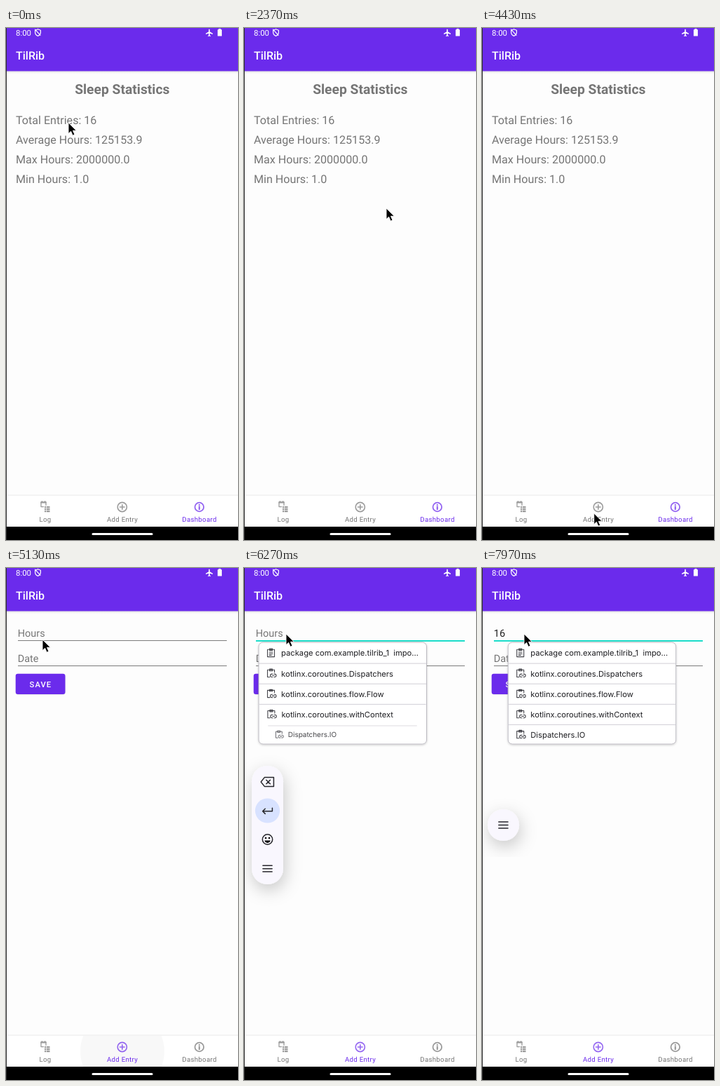
Animation of 331 by 730 pixels, one loop 8 s. Source, as an HTML page:

```html
<!DOCTYPE html>
<html lang="en">
<head>
<meta charset="utf-8">
<title>Sleep tracker</title>
<style>
  html, body { margin: 0; width: 100%; height: 100%; overflow: hidden; background: #fdfdfd; }
  svg { display: block; width: 331px; height: 730px; font-family: Roboto, sans-serif; text-rendering: geometricPrecision; }
  .line { fill: none; stroke: currentColor; stroke-linecap: round; stroke-linejoin: round; }
  .gray { fill: #757575; }
  .tab { color: #757575; }
  .tab.on { color: #6b2bec; }
  .tab text { font-size: 9.64px; letter-spacing: .033em; text-anchor: middle; fill: currentColor; }
  .tab g { opacity: .72; }
  .stats { font-size: 16.1px; }
  .field { font-size: 14.45px; }
  .popup text { font: 11.2px Inter, sans-serif; fill: #1d1d21; }
</style>
</head>
<body>
<svg viewBox="0 0 331 730">
  <defs>
    <linearGradient id="fall" x2="0" y2="1">
      <stop stop-color="#000" stop-opacity=".12"/>
      <stop offset="1" stop-color="#000" stop-opacity="0"/>
    </linearGradient>
    <filter id="softShadow" x="-100%" y="-50%" width="300%" height="200%">
      <feDropShadow dx="2" dy="8" stdDeviation="12" flood-opacity=".22"/>
    </filter>
    <filter id="popupShadow" x="-10%" y="-10%" width="120%" height="120%">
      <feDropShadow dx="0" dy="1" stdDeviation="1.5" flood-opacity=".2"/>
    </filter>
    <clipPath id="navClip"><rect y="667" width="331" height="44"/></clipPath>
  </defs>

  <rect width="331" height="730" fill="#fdfdfd"/>
  <rect y="61" width="331" height="4" fill="url(#fall)"/>
  <rect width="331" height="61.5" fill="#6b2bec"/>

  <g fill="#fff" color="#fff">
    <text x="14" y="10.6" font-size="11.4">8:00</text>
    <path class="line" stroke-width="1.2" d="M45.5 1.8 49.4 3.3V6.4Q49.2 9.8 45.5 11.4 41.8 9.8 41.6 6.4V3.3ZM41.5 2.2 49 10.4"/>
    <path d="M289.2 2.2q.8-1.4 1.6 0V5.2L295 7.8V9L290.8 7.8V10.2L292 11.2V12L290 11.4 288 12V11.2L289.2 10.2V7.8L285 9V7.8L289.2 5.2Z"/>
    <path d="M303.4 1h3v1.2h1.5V11.6h-6V2.2h1.5Z"/>
    <text x="14" y="45.3" font-size="16.06" font-weight="500">TilRib</text>
  </g>

  <g id="dashboard" class="gray">
    <text x="165.8" y="94.4" font-size="19.27" font-weight="700" text-anchor="middle">Sleep Statistics</text>
    <g class="stats">
      <text x="14" y="136.6">Total Entries: 16</text>
      <text x="14" y="164.7">Average Hours: 125153.9</text>
      <text x="14" y="192.8">Max Hours: 2000000.0</text>
      <text x="14" y="220.9">Min Hours: 1.0</text>
    </g>
  </g>

  <g id="entryForm">
    <g class="field gray">
      <text id="hours" x="16.8" y="97.6">Hours</text>
      <text x="16.8" y="133.7">Date</text>
    </g>
    <rect id="hoursLine" x="17" width="298"/>
    <rect x="17" y="139" width="298" height="1" fill="#7c7c7c"/>
    <rect x="14" y="152" width="70.5" height="28.5" rx="3.2" fill="#000" opacity=".15"/>
    <rect x="13.7" y="150.7" width="70.8" height="29.3" rx="3.2" fill="#6b2bec"/>
    <text x="33.6" y="169.7" font-size="11.24" font-weight="500" letter-spacing="1" fill="#fff">SAVE</text>
  </g>

  <rect y="666" width="331" height="46" fill="#fff"/>
  <rect y="665.5" width="331" height="1.2" fill="#ededed"/>
  <g clip-path="url(#navClip)"><circle id="ripple" cx="166" cy="689" fill="#000"/></g>

  <g class="tab" id="tabLog">
    <g fill="currentColor">
      <path class="line" stroke-width="1.3" d="M53.6 682.6H50V676.4H57V680.4"/>
      <path d="M49.4 675.2h1.2v-1h1.6v1h2.6v-1h1.6v1h1.2v2.4h-8.2z"/>
      <path d="M55 682h2v2.2h-2zm2.7 0h4.8v2.2h-4.8zM55 685h2v2.2h-2zm2.7 0h4.8v2.2h-4.8zM55 688h2v2.2h-2zm2.7 0h4.8v2.2h-4.8z"/>
    </g>
    <text x="56" y="703.6">Log</text>
  </g>
  <g class="tab" id="tabAdd">
    <g><path class="line" stroke-width="1.6" d="M159.2 683a6.6 6.6 0 1 0 13.2 0a6.6 6.6 0 1 0-13.2 0M162.5 683h6.6M165.8 679.7v6.6"/></g>
    <text x="166" y="703.6">Add Entry</text>
  </g>
  <g class="tab" id="tabDash">
    <g>
      <path class="line" stroke-width="1.8" d="M269.5 683a6.3 6.3 0 1 0 12.6 0a6.3 6.3 0 1 0-12.6 0"/>
      <path fill="currentColor" d="M274.7 679h2.2v1.8h-2.2zm0 2.4h2.2v5.6h-2.2z"/>
    </g>
    <text x="276" y="703.6">Dashboard</text>
  </g>

  <rect y="711" width="331" height="19"/>
  <rect x="122.5" y="720" width="87" height="3" rx="1.5" fill="#fff"/>

  <g id="toolbar" color="#26262b">
    <rect id="pill" width="45" rx="22.5" fill="#f9f7fe" filter="url(#softShadow)"/>
    <g id="tools">
      <path class="line" stroke-width="1.5" d="M29.2 298.6H42.4V311.4H29.2L24.2 305ZM31.8 302.2l5.6 5.6M37.4 302.2l-5.6 5.6"/>
      <circle cx="33.5" cy="346" r="17.6" fill="#d8e2ff"/>
      <path class="line" stroke-width="1.5" d="M40.4 342.2V346.8H26.8M30.2 343.2 26.6 346.8 30.2 350.4"/>
      <circle class="line" stroke-width="1.5" cx="33.5" cy="387" r="7.2"/>
      <path d="M29.4 388.6h8.2a4.2 4.2 0 0 1-8.2 0Z"/>
      <circle cx="31" cy="385" r="1.3"/><circle cx="36" cy="385" r="1.3"/>
    </g>
    <path id="menu" class="line" stroke-width="1.5" d="M-6.6-4.4H6.6M-6.6 0H6.6M-6.6 4.4H6.6"/>
  </g>

  <g id="popup" class="popup">
    <rect x=".5" y="106" width="239.5" height="145" rx="6" fill="#fff" stroke="#bcbac2" filter="url(#popupShadow)"/>
  </g>

  <rect width="1" height="730" fill="#2b2b2b"/>
  <path id="cursor" d="M0 0V15.6L3.6 12.3 6.2 18.2 9 17 6.5 11.3H11.4Z" stroke="#fff" stroke-width=".9"/>
</svg>

<script>
const LOOP = 8000;
const ADD_TAP = 4640, FOCUS = 5580, POPUP = 5940;
const KEYS = [7180, 7400];
const COLLAPSE = 7270;

// Pointer tip: time, x, y
const POINTER = [
  [0, 89, 135], [1230, 126, 137], [1500, 130, 139], [2370, 203, 257], [2560, 203, 263],
  [3260, 72, 700], [3670, 60, 693], [4020, 60, 693], [4480, 163, 692], [4670, 163, 692],
  [5020, 55, 107], [5130, 52, 102], [5370, 60, 94]
];
const SUGGESTIONS = [
  "package com.example.tilrib_1\u00a0 impo…",
  "kotlinx.coroutines.Dispatchers",
  "kotlinx.coroutines.flow.Flow",
  "kotlinx.coroutines.withContext",
  "Dispatchers.IO"
];
const CLIP_TEXT = "M1 2.2H11V12.6H1ZM4 1H8V3.4H4ZM3.6 6H8.4M3.6 8.2H8.4M3.6 10.4H6.6";
const CLIP_LINK = "M4.2 12.4H1V2.2H11V5.6M4 1H8V3.6H4ZM8.2 8H7.2a2.2 2.2 0 0 0 0 4.4H8.2M10.4 8H11.2a2.2 2.2 0 0 1 0 4.4H10.4M7.8 10.2H10.8";

const $ = id => document.getElementById(id);
const set = (el, attrs) => { for (const key in attrs) el.setAttribute(key, attrs[key]); };
const show = (el, on) => { el.style.display = on ? "" : "none"; };
const mix = (a, b, p) => a + (b - a) * p;
const progress = (t, start, length) => Math.min(1, Math.max(0, (t - start) / length));
const smooth = p => p * p * (3 - 2 * p);
const easeOut = p => 1 - (1 - p) ** 2;

function addRow(label, i) {
  const row = document.createElementNS("http://www.w3.org/2000/svg", "g");
  const top = 107 + 29.1 * i;
  row.innerHTML = `${i ? `<path d="M.5 ${top}H239.5" stroke="#d0ced6"/>` : ""}
    <path class="line" color="#45454b" stroke-width="1.1" d="${i ? CLIP_LINK : CLIP_TEXT}" transform="translate(12 ${top + 7})"/>
    <text x="32.6" y="${top + 18.4}">${label}</text>`;
  $("popup").append(row);
  return row;
}
const rows = SUGGESTIONS.map(addRow);

function pointerAt(t) {
  const next = POINTER.findIndex(point => point[0] > t);
  if (next < 0) return POINTER.at(-1).slice(1);
  const [t0, x0, y0] = POINTER[next - 1], [t1, x1, y1] = POINTER[next];
  const p = smooth((t - t0) / (t1 - t0));
  return [mix(x0, x1, p), mix(y0, y1, p)];
}

function drawForm(t) {
  const typed = "16".slice(0, KEYS.filter(key => t >= key).length);
  const focused = t >= FOCUS;
  $("hours").textContent = typed || "Hours";
  set($("hours"), { fill: typed ? "#222" : "#757575" });
  set($("hoursLine"), { y: 103, height: focused ? 1.8 : 1, fill: focused ? "#03dac5" : "#7c7c7c" });
  return typed.length;
}

function drawToolbar(t) {
  const enter = easeOut(progress(t, FOCUS + 80, 200));
  const fold = smooth(progress(t, COLLAPSE, 230));
  show($("toolbar"), enter > 0);
  set($("toolbar"), { opacity: enter });
  set($("pill"), { x: mix(11, 8, fold), y: mix(282, 344, fold), height: mix(169, 45, fold) });
  set($("tools"), { opacity: Math.max(0, 1 - fold * 2.5) });
  set($("menu"), { transform: `translate(${mix(33.5, 30.4, fold)} ${mix(428.7, 366.5, fold)})` });
}

function drawPopup(t, typedCount) {
  const enter = progress(t, POPUP, 70);
  show($("popup"), enter > 0);
  // The list follows the text caret.
  set($("popup"), { opacity: enter, transform: `translate(${20.5 + 8.1 * typedCount} 0)` });
  rows.forEach((row, i) => {
    const p = easeOut(progress(t, POPUP + 44 + 60 * i, 120));
    const cy = 121 + 29.1 * i;
    set(row, { opacity: Math.min(1, p * 1.3), transform: `translate(120 ${cy}) scale(${mix(.7, 1, p)}) translate(-120 ${-cy})` });
  });
}

function draw(t) {
  const adding = t >= ADD_TAP;
  show($("dashboard"), !adding);
  show($("entryForm"), adding);
  $("tabAdd").classList.toggle("on", adding);
  $("tabDash").classList.toggle("on", !adding);

  const spread = easeOut(progress(t, ADD_TAP - 60, 250));
  const fade = 1 - progress(t, ADD_TAP + 260, 460);
  set($("ripple"), { r: 60 * spread, opacity: .055 * fade });

  const typedCount = drawForm(t);
  drawToolbar(t);
  drawPopup(t, typedCount);
  set($("cursor"), { transform: `translate(${pointerAt(t).join(" ")})` });
}

const start = performance.now();
function tick() {
  draw((performance.now() - start) % LOOP);
  requestAnimationFrame(tick);
}
tick();
</script>
</body>
</html>
```
